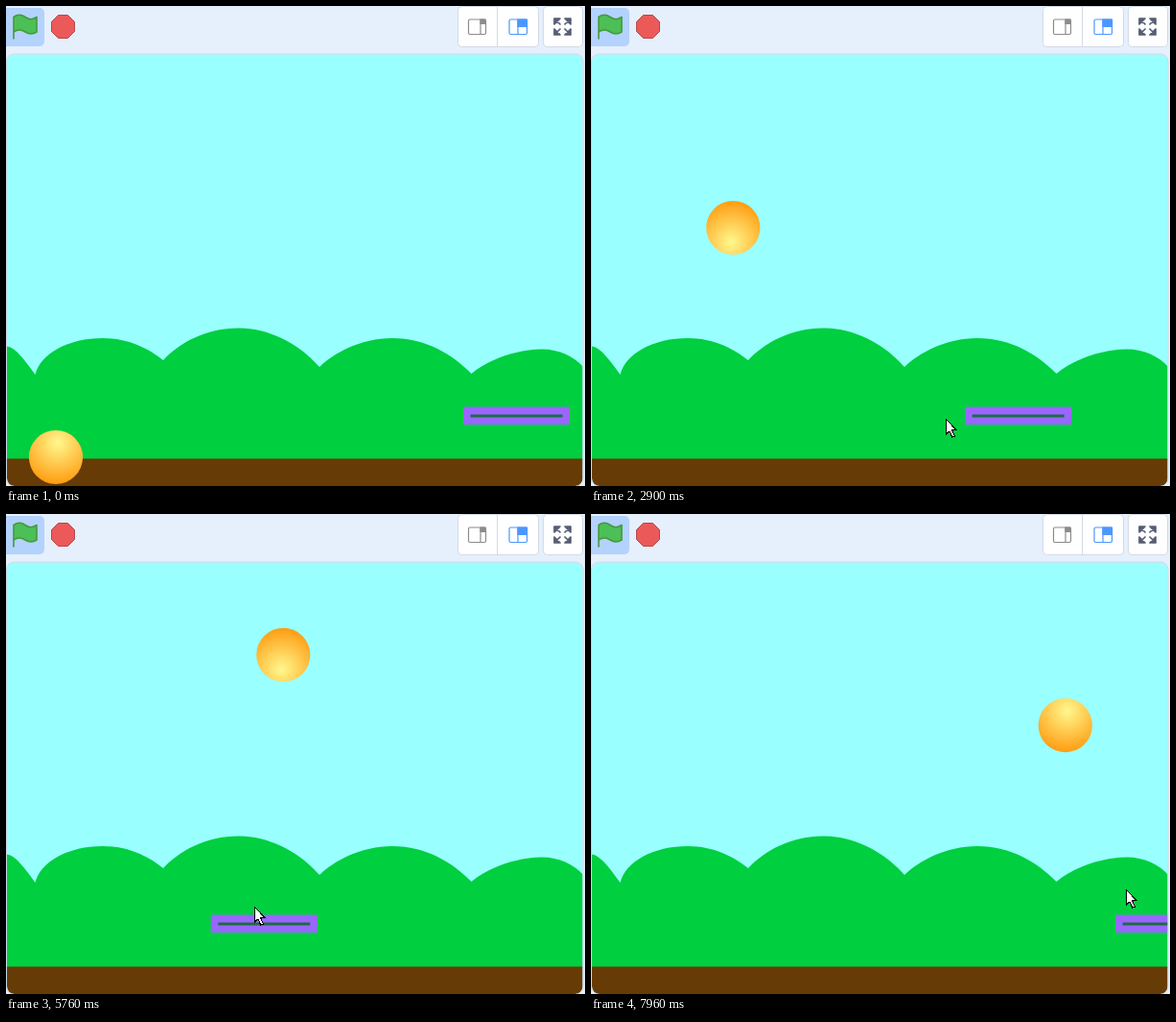
These frames come from a looping animation (604x500 px, 8000 ms). An HTML page:

```html
<!DOCTYPE html>
<html lang="en">
<head>
<meta charset="utf-8">
<title>Paddle game</title>
<style>
  html, body { margin: 0; width: 100%; height: 100%; overflow: hidden; background: #e5f0fc; }
  svg { display: block; width: 604px; height: 500px; }
</style>
</head>
<body>
<svg viewBox="0 0 604 500">
  <defs>
    <radialGradient id="glow" gradientUnits="userSpaceOnUse" cx="2" cy="-15" r="44">
      <stop offset="0" stop-color="#fff88e"/>
      <stop offset="1" stop-color="#ff9a0e"/>
    </radialGradient>
    <clipPath id="stage"><rect x="1" y="50.5" width="600.5" height="449.5" rx="8"/></clipPath>
    <path id="arrow" d="M1 1H7L1 7ZM2 2L7.5 7.5"/>
  </defs>

  <rect width="604" height="500" fill="#e5f0fc"/>

  <g id="toolbar">
    <rect x="-4" y="2" width="44" height="40" rx="5" fill="#b3d2fd"/>
    <path d="M8 34V11.5Q14 7 20 11.5T32 11.5V27Q26 31 20 27T8 27" fill="#4cbf56" stroke="#45993d" stroke-width="1.6" stroke-linecap="round" stroke-linejoin="round"/>
    <path d="M54.5 9.5H64.5L71.5 16.5V26.5L64.5 33.5H54.5L47.5 26.5V16.5Z" fill="#ec5959" stroke="#b84848" stroke-linejoin="round"/>

    <g fill="#fff" stroke="#d3dae5">
      <rect x="471.5" y=".5" width="84" height="42" rx="4"/>
      <path d="M512.5 .5V42.5"/>
      <rect x="560.5" y=".5" width="41" height="42" rx="4"/>
    </g>
    <g fill="none" stroke="#8c8c8c" stroke-width="1.2">
      <rect x="482.5" y="14" width="18" height="15.5" rx="1.5"/>
      <path d="M495 14V29.5"/>
      <path d="M495 14H500V18.5H495Z" fill="#8c8c8c"/>
    </g>
    <g fill="none" stroke="#4c97ff" stroke-width="1.2">
      <rect x="525" y="14" width="18.5" height="15.5" rx="1.5"/>
      <path d="M534 14V29.5"/>
      <path d="M534 14H543.5V21.5H534Z" fill="#4c97ff"/>
    </g>
    <g fill="#575e75" stroke="#575e75" stroke-width="1.7" stroke-linejoin="round">
      <use href="#arrow" transform="translate(571 12)"/>
      <use href="#arrow" transform="translate(590 12) scale(-1 1)"/>
      <use href="#arrow" transform="translate(571 31) scale(1 -1)"/>
      <use href="#arrow" transform="translate(590 31) scale(-1 -1)"/>
    </g>
  </g>

  <g clip-path="url(#stage)">
    <rect y="50" width="604" height="450" fill="#99ffff"/>
    <path fill="#00cf40" d="M0 354.5C10 355 20 370 30.5 384C36 362 65 346 101 346C128 346 149 357 164 369C180 351.5 208 335.5 243 335.5C280 335.5 311 357 327 376C342 361.500 370 346 403 346C438 346 466 363 485.5 383C503 369 530 358 559 357.5C578 357.5 594 366 603 377V473H0Z"/>
    <rect y="471.5" width="604" height="30" fill="#663b05"/>
    <g id="paddle">
      <rect x="-55.5" y="417.5" width="111" height="18.5" fill="#9966ff"/>
      <rect x="-48" y="425.5" width="96" height="3" fill="#1d6b45"/>
    </g>
    <circle id="ball" r="28.1" fill="url(#glow)"/>
  </g>
  <rect x=".5" y="50" width="601.5" height="450.5" rx="8" fill="none" stroke="#c8d9e6"/>

  <path id="cursor" d="M0 0V15.5L3.5 12.3L6.3 18.7L9 17.5L6.2 11.3H10.8Z" fill="#fff" stroke="#000" shape-rendering="crispEdges"/>
</svg>

<script>
const LOOP = 8000;
const LAUNCH = 66;
const SPEED = { x: 0.342, y: 0.1974 };
const BOUNDS = { left: 29, right: 574, top: 77, bottom: 393 };
const BALL_START = { x: 52, y: 470 };
const PADDLE_LAG = 85;

// [time, length] of moments when the game hangs
const pauses = [[2500, 63], [3730, 15], [5200, 70], [6500, 77]];

// [time, position] where the hand changes direction
const sweepsX = [
  [0, 532.5], [743, 650], [1820, 35], [2494, 600], [3350, 100], [3750, 285], [4250, 285],
  [4925, 485], [5800, 258], [6400, 68], [7215, 270], [7735, 635], [8300, 410]
];
const sweepsY = [
  [0, 510], [800, 410], [2200, 410], [2900, 430], [4000, 409], [5760, 409], [7300, 386], [8300, 393]
];

const [paddle, ball, cursor] = ["paddle", "ball", "cursor"].map(id => document.getElementById(id));
const clamp = (value, low, high) => Math.min(high, Math.max(low, value));

// Back and forth between low and high, with the direction of travel.
function bounce(distance, low, high) {
  const span = high - low;
  const leg = Math.floor(distance / span), rest = distance - leg * span;
  return leg % 2 ? { at: high - rest, dir: -1 } : { at: low + rest, dir: 1 };
}

function sweep(turns, time) {
  const i = turns.findIndex(turn => turn[0] > time);
  const [t0, a] = turns[i - 1], [t1, b] = turns[i];
  return a + (b - a) * (1 - Math.cos(Math.PI * (time - t0) / (t1 - t0))) / 2;
}

function ballState(time) {
  const lost = pauses.reduce((sum, [at, length]) => sum + clamp(time - at, 0, length), 0);
  const run = Math.max(0, time - LAUNCH - lost);
  const x = bounce(BALL_START.x - BOUNDS.left + SPEED.x * run, BOUNDS.left, BOUNDS.right);
  // The launch point lies below the paddle, so the first climb is longer.
  const fallen = SPEED.y * run - (BALL_START.y - BOUNDS.top);
  const y = fallen < 0
    ? { at: BOUNDS.top - fallen, dir: -1 }
    : bounce(fallen, BOUNDS.top, BOUNDS.bottom);
  const heading = Math.atan2(y.dir * SPEED.y, x.dir * SPEED.x) * 180 / Math.PI;
  return { x: x.at, y: y.at, turn: heading + 30 };
}

function place(node, x, y, turn = 0) {
  node.setAttribute("transform", `translate(${x.toFixed(2)} ${y.toFixed(2)}) rotate(${turn.toFixed(1)})`);
}

// The game advances 30 times a second, on a clock of hundredths.
function tickTime(ms) {
  const tick = Math.ceil((Math.floor(ms / 10) + 1) * 3 / 10) - 1;
  return Math.floor(tick * 10 / 3) * 10;
}

function draw(now) {
  const time = tickTime(now % LOOP);
  const { x, y, turn } = ballState(time);
  place(ball, x, y, turn);
  place(paddle, sweep(sweepsX, Math.max(0, time - PADDLE_LAG)), 0);
  place(cursor, Math.round(sweep(sweepsX, time)) + 0.5, Math.round(sweep(sweepsY, time)) + 0.5);
}

const start = performance.now();
function frame() {
  draw(performance.now() - start);
  requestAnimationFrame(frame);
}
frame();
</script>
</body>
</html>
```
